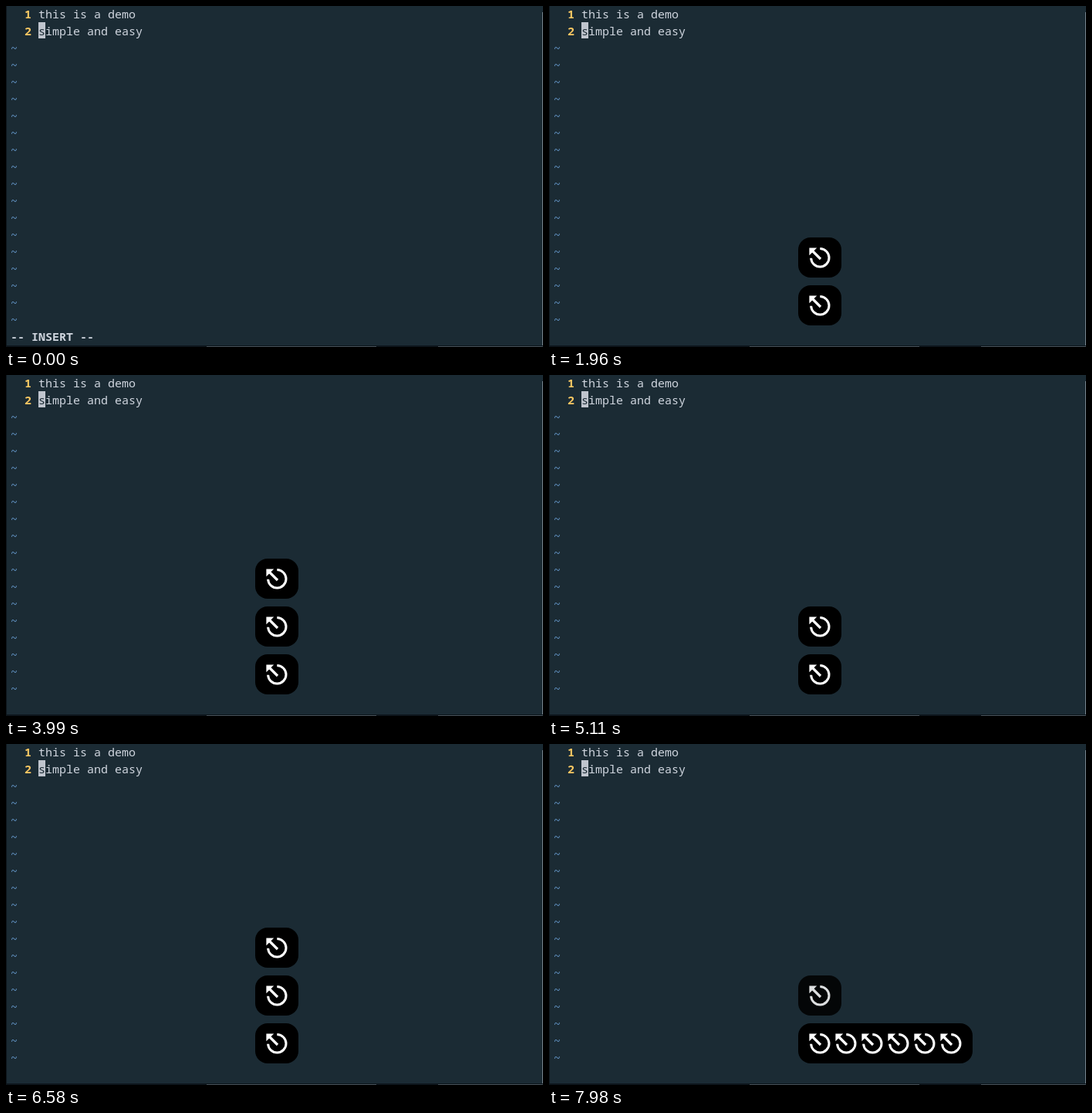
Write an HTML page that moves like this. It is 696 by 442 pixels and loops after 8050 ms.

```html
<!DOCTYPE html>
<html lang="en">
<head>
<meta charset="utf-8">
<title>Editor with key overlay</title>
<style>
  html, body { margin: 0; width: 100%; height: 100%; overflow: hidden; background: #1b2b34; }
  svg { display: block; width: 696px; height: 442px; }
  text { font: 15px "Noto Sans Mono", "DejaVu Sans Mono", monospace; fill: #d0d6df; white-space: pre; }
  .num { fill: #fac863; font-weight: 600; }
  .tilde { fill: #6699cc; }
  .mode { font-weight: 700; }
</style>
</head>
<body>
<svg id="stage" viewBox="0 0 696 442" xmlns="http://www.w3.org/2000/svg">
  <defs>
    <g id="esc">
      <path d="M28.3 14.6A11.7 11.7 0 1 1 16.6 26.8" fill="none" stroke="#fff" stroke-width="3"/>
      <path d="M18 17L29 28" stroke="#fff" stroke-width="3.2"/>
      <path d="M14.4 13.4H24.2L14.4 23.2Z" fill="#fff"/>
    </g>
  </defs>
  <rect width="696" height="442" fill="#1b2b34"/>
  <rect width="1" height="442" fill="#0e171d"/>
  <rect x="695" y="8" width="1" height="434" fill="#75818a"/>
  <rect y="440" width="696" height="2" fill="#0c141a"/>
  <path d="M260 441.5H480M560 441.5H696" stroke="#47525a"/>
  <g id="lines"></g>
  <g id="keys"></g>
</svg>
<script>
const NS = "http://www.w3.org/2000/svg";
const LOOP = 8050, STEP = 70, FADE = 220;
const COL = 9, ROW = 22, LEFT = 6, BASE = 16;
const KEY_X = 323, KEY_Y = 362, KEY_GAP = 62, KEY_W = 56, ICON_W = 34;

// Each line of keys: press times, then the moment it starts to fade.
const presses = [
  { at: [490], fade: 2710 },
  { at: [1890], fade: 4110 },
  { at: [2240], fade: 4400 },
  { at: [3500], fade: 5737 },
  { at: [4130], fade: 6260 },
  { at: [5180], fade: 7300 },
  { at: [5800], fade: 7947 },
  { at: [6580, 6930, 7280, 7630, 7770, 7910], fade: Infinity }
];

function add(parent, tag, attrs, content) {
  const el = document.createElementNS(NS, tag);
  for (const name in attrs) el.setAttribute(name, attrs[name]);
  if (content) el.textContent = content;
  parent.appendChild(el);
  return el;
}

const lines = document.getElementById("lines");
function write(row, col, content, cls = "") {
  return add(lines, "text", { x: LEFT + col * COL, y: BASE + row * ROW, class: cls }, content);
}

write(0, 2, "1", "num");
write(0, 4, "this is a demo");
write(1, 2, "2", "num");
add(lines, "rect", { x: 42, y: 21, width: 9, height: 21, fill: "#c0c5ce" });
write(1, 4, "s").style.fill = "#1b2b34";
write(1, 5, "imple and easy");
for (let row = 2; row < 19; row++) write(row, 0, "~", "tilde");
const mode = write(19, 0, "-- INSERT --", "mode");

const keys = document.getElementById("keys");
for (const p of presses) {
  p.el = add(keys, "g", {});
  p.box = add(p.el, "rect", { width: KEY_W, height: 52, rx: 16 });
  p.icons = p.at.map((_, i) => add(p.el, "use", { href: "#esc", x: i * ICON_W }));
}

const show = (el, on) => el.setAttribute("visibility", on ? "visible" : "hidden");

function render(t) {
  show(mode, t < presses[0].at[0]);
  presses.forEach((p, i) => {
    const count = p.at.filter(at => at <= t).length;
    const alpha = count ? Math.max(0, Math.min(1, 1 - (t - p.fade) / FADE)) : 0;
    const above = presses.slice(i + 1).filter(q => q.at[0] <= t).length;
    p.el.setAttribute("opacity", alpha);
    p.el.setAttribute("transform", `translate(${KEY_X} ${KEY_Y - above * KEY_GAP})`);
    p.box.setAttribute("width", KEY_W + Math.max(0, count - 1) * ICON_W);
    p.icons.forEach((icon, n) => show(icon, n < count));
  });
}

const start = performance.now();
function tick() {
  const t = (performance.now() - start) % LOOP;
  render(Math.floor(t / STEP) * STEP);
  requestAnimationFrame(tick);
}
render(0);
requestAnimationFrame(tick);
</script>
</body>
</html>
```
